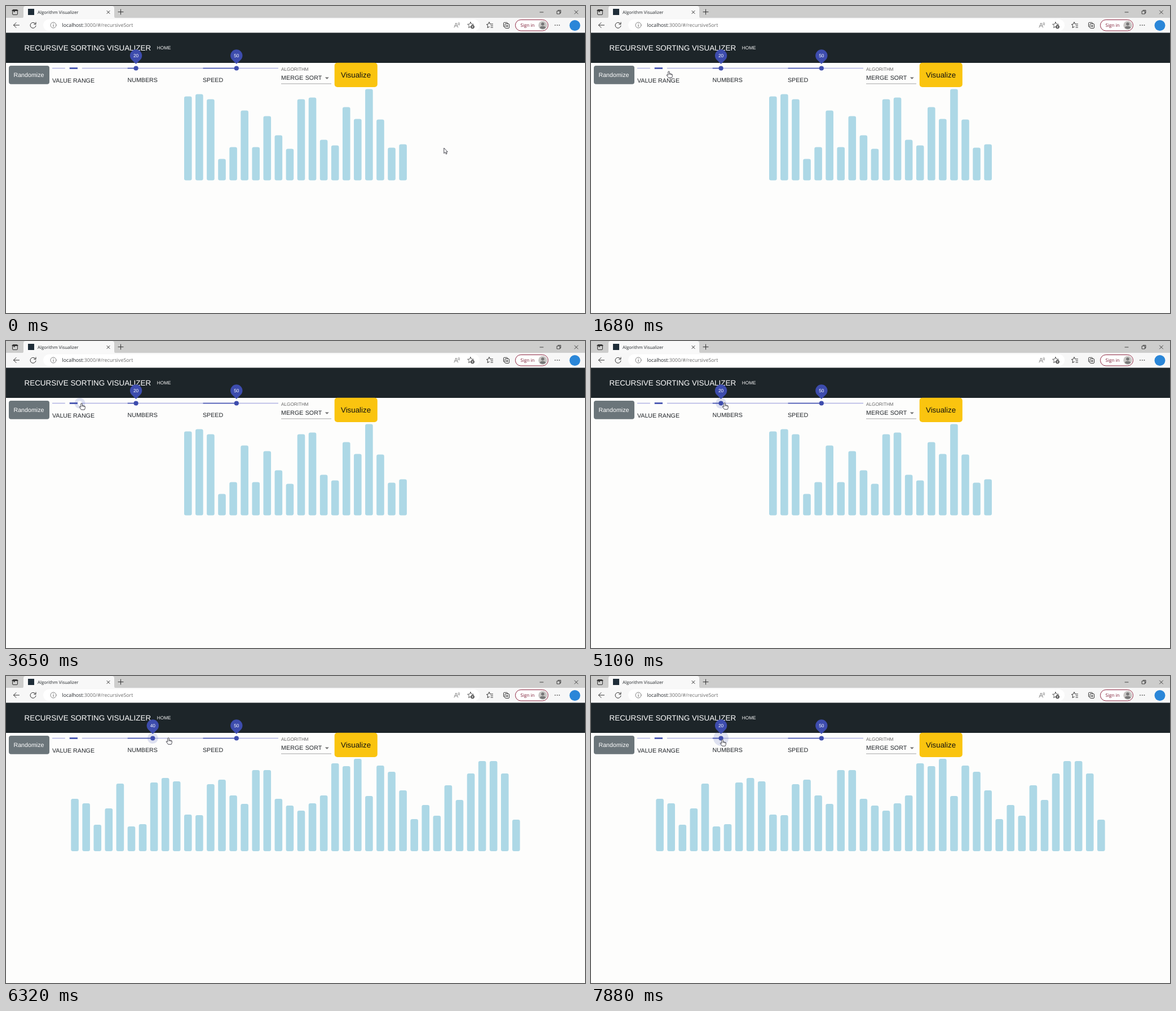
These frames come from a looping animation (1027x545 px, 8000 ms). An HTML page:

```html
<!DOCTYPE html>
<html lang="en">
<head>
<meta charset="utf-8">
<title>Recursive sorting visualizer</title>
<style>
  html, body { margin: 0; width: 100%; height: 100%; overflow: hidden; background: #fdfdfc; }
  svg { display: block; }
  text { font-family: "Liberation Sans", Arial, sans-serif; font-size: 10.67px; fill: #212529; text-rendering: geometricPrecision; }
  .ui { font-family: "Open Sans", "Noto Sans", sans-serif; }
  .line { fill: none; stroke: #333; stroke-width: 1; stroke-linecap: round; stroke-linejoin: round; }
  .rail { stroke: #b0b2e2; stroke-width: 1.4; }
  .track { stroke: #3d4cad; stroke-width: 1.6; }
  .pin { fill: #3d4cad; }
  .pin + text { fill: #fff; font-size: 8.3px; text-anchor: middle; }
  .halo { fill: #3f51b5; fill-opacity: .16; }
  .bar { fill: #add8e6; }
</style>
</head>
<body>
<svg width="1027" height="545" viewBox="0 0 1027 545">
  <!-- browser tabs -->
  <rect width="1027" height="22" fill="#cdcdcc"/>
  <path d="M27 22Q31 22 31 18V4Q31 0 35 0H188Q192 0 192 4V18Q192 22 196 22Z" fill="#f8f8f8"/>
  <rect x="11.5" y="6.5" width="9" height="9" rx="1.5" class="line"/>
  <path d="M11.5 8H20.5M14.5 8V10" class="line" style="stroke-width:2.2"/>
  <rect x="39" y="5" width="11" height="11" fill="#1f2d38"/>
  <text x="56" y="13.6" class="ui" style="font-size:7.8px">Algorithm Visualizer</text>
  <path d="M179 8.5L184 13.5M184 8.5L179 13.5M199 10.5H208M203.5 6V15" class="line"/>
  <path d="M947 11H953M1008.5 8L1014.5 14M1014.5 8L1008.5 14M979 8V7.5H984V12.5H983M977.5 9H982.5V14H977.5Z" class="line" style="stroke-width:.9"/>

  <!-- browser toolbar -->
  <rect y="21" width="1027" height="27" fill="#f7f7f7"/>
  <rect x="66" y="23.5" width="774" height="21" rx="10.5" fill="#fff"/>
  <path d="M23.5 34H13.5M18 29.5L13.5 34L18 38.5" class="line"/>
  <path d="M52.5 32A5 5 0 1 0 53 35M53 29V32.3H49.7" class="line"/>
  <circle cx="84" cy="34" r="5" class="line" style="stroke:#666;stroke-width:.8"/>
  <path d="M84 33.5V36.5M84 31.5V31.6" class="line" style="stroke:#666"/>
  <text x="99.5" y="37.2" class="ui" style="font-size:8.82px">localhost<tspan fill="#6b6b6b">:3000/#/recursiveSort</tspan></text>
  <path d="M795 38L798.3 30L801.6 38M796.2 35.3H800.4M801.5 30.5Q803 31.8 802.2 33.3M803.2 29Q805.4 31.3 804 34" class="line" style="stroke:#666;stroke-width:.8"/>
  <g class="line" style="stroke:#555">
    <path d="M824 28.5L825.6 32L829.3 32.4L826.5 35L827.3 38.7L824 36.8L820.7 38.7L821.5 35L818.7 32.4L822.4 32Z"/>
    <circle cx="827.5" cy="37" r="3" fill="#555"/>
    <path d="M826 37H829M827.5 35.5V38.5" style="stroke:#fff;stroke-width:.7"/>
  </g>
  <path d="M857 28.8L858.6 32H863.5M860 35H863.5M860 38H863.5M857 28.8L855.3 32.2L852.5 32.6L854.6 35L854 38.7L857.4 36.8" class="line"/>
  <path d="M884 37H883.5Q882.5 37 882.5 36V30.5Q882.5 29.3 883.7 29.3H888.5Q889.5 29.3 889.5 30.5" class="line"/>
  <rect x="885" y="31.5" width="7.5" height="8" rx="1.5" class="line"/>
  <path d="M887 35.5H890.5M888.75 33.7V37.3" class="line"/>
  <rect x="903.5" y="24.5" width="58" height="19.5" rx="9.7" fill="#fff" stroke="#8f2842"/>
  <text x="912.5" y="37" class="ui" style="font-size:8.1px;fill:#7b1730">Sign in</text>
  <circle cx="952" cy="34.3" r="7.7" fill="#c8c6c4"/>
  <circle cx="952" cy="32" r="2.8" fill="#777"/>
  <path d="M947 39Q947 35.8 952 35.8T957 39Q952 42.3 947 39Z" fill="#777"/>
  <path d="M974 34H974.1M977.7 34H977.8M981.4 34H981.5" class="line" style="stroke-width:1.7"/>
  <circle cx="1009" cy="34.5" r="9.5" fill="#2a86d8"/>

  <!-- page -->
  <rect y="47.5" width="1027" height="53.5" fill="#1d2529"/>
  <text x="32.6" y="78.5" style="font-size:13.4px;fill:#fff">RECURSIVE SORTING VISUALIZER</text>
  <text x="267.7" y="77" style="font-size:8.3px;fill:#f4f4f4">HOME</text>
  <rect x="5" y="106" width="72" height="32.7" rx="4" fill="#6b757a"/>
  <text x="13.5" y="126" style="fill:#fff">Randomize</text>
  <rect x="582.7" y="100.8" width="76.1" height="43.2" rx="5" fill="#fac40f"/>
  <text x="594" y="126.6" style="font-size:13.33px;fill:#111">Visualize</text>
  <text x="82" y="135.7">VALUE RANGE</text>
  <text x="215.5" y="134.6">NUMBERS</text>
  <text x="349" y="134.6">SPEED</text>
  <text x="488" y="114.5" style="font-size:8.2px;fill:#666">ALGORITHM</text>
  <text x="488" y="130.9" style="letter-spacing:.1px">MERGE SORT</text>
  <path d="M565.8 126.5H572.8L569.3 130Z" fill="#757575"/>
  <path d="M488 138H577" stroke="#8e8e8e" stroke-width=".8"/>

  <g id="bars"></g>

  <path d="M82 110.5H483" class="rail"/>
  <path d="M108.8 110.5H130.9" class="track" style="stroke-width:2.6"/>
  <circle id="rangeHalo" class="halo" cx="130.9" cy="110.5"/>
  <circle cx="108.8" cy="110.5" r="4" fill="#fdfdfc"/>
  <circle cx="130.9" cy="110.5" r="4" fill="#fefefe"/>
  <path id="count" class="track"/>
  <path d="M349.5 110.5H408.8" class="track"/>
  <g id="countPin"></g>
  <g id="speedPin" transform="translate(408.8 110.5)"></g>

  <g id="cursor" stroke="#33333b" stroke-width=".9" stroke-linejoin="round" fill="#fff">
    <path id="arrow" d="M0 0V9.6L2.2 7.6L3.8 11L5.4 10.2L3.9 7H6.6Z"/>
    <path id="hand" d="M-1.2 1.2Q0 -.6 1.2 1.2V4.6Q2.2 3.8 3 5Q4 4.3 4.7 5.5Q6.3 5 6.3 6.8V8.5Q6.2 10.2 5.2 12H-.4Q-2 9.6-3.7 7.6Q-3.9 6-2.2 6.7L-1.2 7.5ZM1.2 4.6V6.4M3 5V6.6M4.7 5.5V7"/>
  </g>
</svg>
<script>
const LOOP = 8000, PRESS = 5120, RELEASE = 5910, PRESS_AGAIN = 7000;
const RAIL_X = 215.7, RAIL_Y = 110.5, RANGE_X = 130.9, STEP_WIDTH = 14.86;
const HOVER = 9.5, ACTIVE = 13.4;
const $ = id => document.getElementById(id);
const ease = p => p * p * (3 - 2 * p);

// The pointer glides to each stop and rests there.
const home = { x: 776.8, y: 252 };
const glides = [
  { from: 400, to: 1560, x: 138, y: 115.5 },
  { from: 1700, to: 2430, x: 134, y: 110 },
  { from: 4170, to: 4870, x: 237, y: 109.3 },
  { from: PRESS, to: 5720, x: 265, y: 110.5 },
  { from: RELEASE, to: 6220, x: 288, y: 109.3 },
  { from: 6480, to: 6950, x: 264, y: 110 },
  { from: PRESS_AGAIN, to: 7600, x: 233, y: 112.3 },
];

function pointerAt(t) {
  return glides.reduce((p, g) => {
    const k = ease(Math.min(1, Math.max(0, (t - g.from) / (g.to - g.from))));
    return { x: p.x + (g.x - p.x) * k, y: p.y + (g.y - p.y) * k };
  }, home);
}

// The count slider follows a pressed pointer in steps of ten.
const isPressed = t => t >= PRESS && t < RELEASE || t >= PRESS_AGAIN;
function countAt(t) {
  if (t < PRESS) return 20;
  const held = isPressed(t) ? t : RELEASE;
  return 10 + 10 * Math.round((pointerAt(held).x - RAIL_X) / STEP_WIDTH);
}

// Values being sorted, as bar heights.
const before = [149, 153, 144, 38, 59, 124, 59, 114, 80, 56, 144, 147, 72, 62, 130, 109, 162, 108, 58, 64];
const after = [93, 85, 47, 76, 120, 44, 48, 122, 130, 124, 65, 64, 119, 127, 99, 84, 144, 144, 93, 81,
  72, 85, 99, 156, 151, 164, 98, 152, 141, 108, 57, 82, 63, 117, 91, 138, 160, 160, 138, 56];

let shown;
function showBars(heights) {
  if (shown === heights) return;
  shown = heights;
  const pitch = 20.07, count = heights.length;
  const left = 516.7 - count * pitch / 2, bottom = 308.1 + count * .07;
  $("bars").innerHTML = heights.map((h, i) =>
    `<rect class="bar" x="${left + i * pitch}" y="${bottom - h}" width="13.6" height="${h}" rx="3.2"/>`).join("");
}

for (const id of ["countPin", "speedPin"]) {
  $(id).innerHTML = `<circle class="halo"/><circle r="4.1" class="pin"/>
    <path class="pin" d="M0 -7.4L-7.55 -15A10.67 10.67 0 1 1 7.55 -15Z"/><text y="-19.6">50</text>`;
}
const countLabel = $("countPin").querySelector("text");
const countHalo = $("countPin").querySelector(".halo");

function draw(t) {
  const pointer = pointerAt(t), count = countAt(t);
  const countX = RAIL_X + (count / 10 - 1) * STEP_WIDTH;
  const isOver = x => Math.hypot(pointer.x - x, pointer.y - RAIL_Y) < 7.5;

  $("count").setAttribute("d", `M${RAIL_X} ${RAIL_Y}H${countX}`);
  $("countPin").setAttribute("transform", `translate(${countX} ${RAIL_Y})`);
  countLabel.textContent = count;
  countHalo.setAttribute("r", isPressed(t) ? ACTIVE : t > PRESS || isOver(countX) ? HOVER : 0);
  $("rangeHalo").setAttribute("r", isOver(RANGE_X) ? HOVER : 0);
  showBars(t < RELEASE ? before : after);

  const onSlider = pointer.y < 121;
  $("cursor").setAttribute("transform", `translate(${pointer.x} ${pointer.y})`);
  $("hand").style.display = onSlider ? "" : "none";
  $("arrow").style.display = onSlider ? "none" : "";
}

const start = performance.now();
function tick() {
  draw((performance.now() - start) % LOOP);
  requestAnimationFrame(tick);
}
tick();
</script>
</body>
</html>
```
